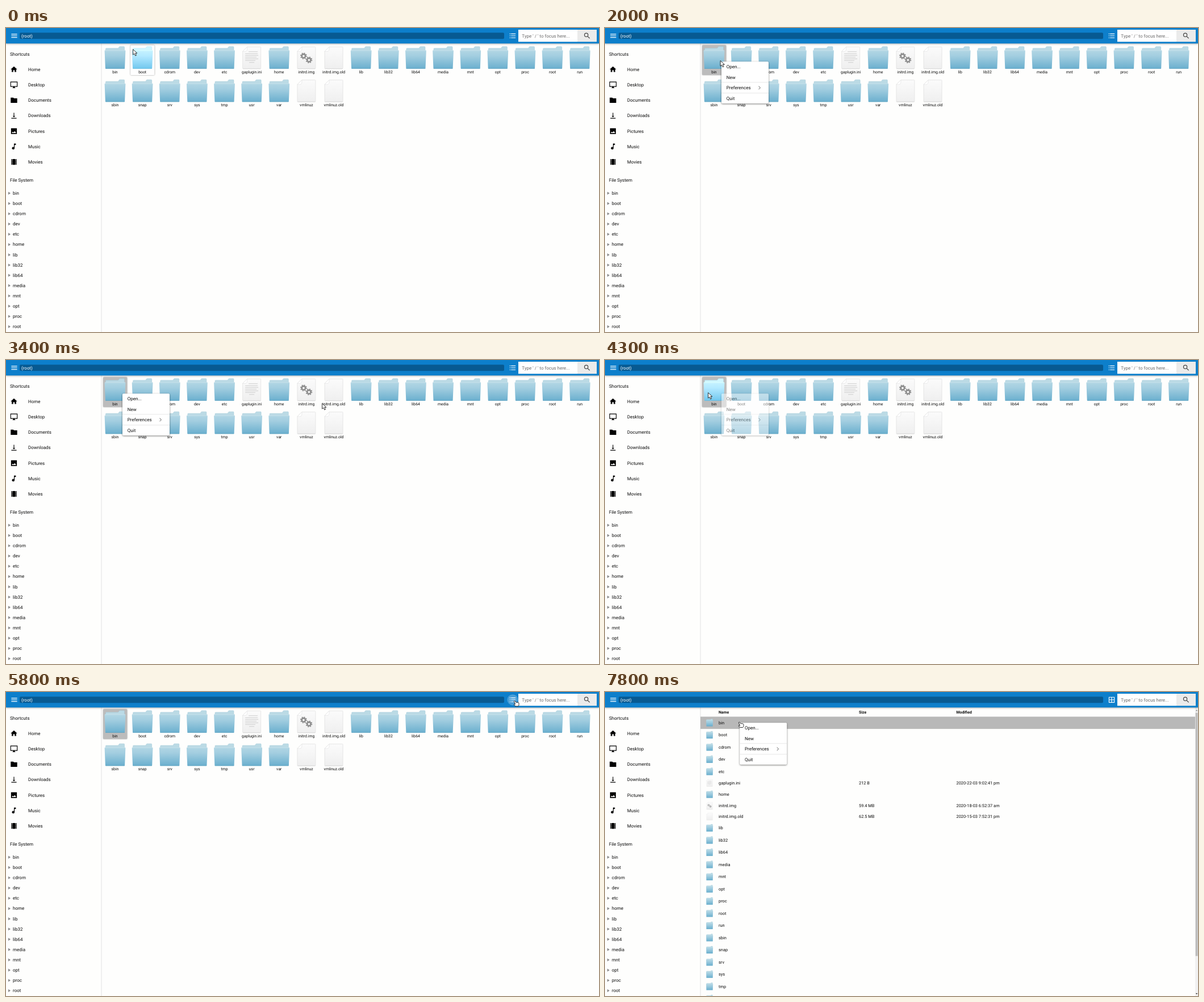
An HTML page that plays this animation: 1044x536 px, repeating every 8 s.

```html
<!DOCTYPE html>
<html lang="en">
<head>
<meta charset="utf-8">
<title>File manager</title>
<style>
html, body { margin: 0; width: 100%; height: 100%; overflow: hidden; background: #fefefd; }
svg { display: block; }
text { font: 8px Roboto, Arial, sans-serif; text-rendering: geometricPrecision; fill: #0c0c0c; white-space: pre; }
.label { font-size: 6.86px; text-anchor: middle; }
.head { font-size: 6.86px; font-weight: 700; }
.cell { font-size: 7.43px; }
.light { fill: #fff; }
.hint { fill: #6b6b6b; }
.card { fill: none; }
.sel .card { fill: #bcbcbc; filter: drop-shadow(0 .6px .8px rgba(0,0,0,.3)); }
.hover .card { fill: #fefefe; filter: drop-shadow(0 .8px 1px rgba(0,0,0,.42)); }
.sel.hover .card { fill: #bcbcbc; }
.hover use { filter: brightness(1.13) saturate(1.1); }
#menu .box { fill: #fff; filter: drop-shadow(0 1px 1.6px rgba(0,0,0,.5)); }
#bar { filter: drop-shadow(0 1px 1.5px rgba(0,0,0,.3)); }
</style>
</head>
<body>
<svg width="1044" height="536" viewBox="0 0 1044 536">
  <defs>
    <linearGradient id="front" x2="0" y2="1">
      <stop stop-color="#b2d6e4"/><stop offset=".3" stop-color="#a3cee0"/><stop offset="1" stop-color="#6aafce"/>
    </linearGradient>
    <linearGradient id="paper" x2="0" y2="1">
      <stop stop-color="#fbfbfb"/><stop offset="1" stop-color="#efefef"/>
    </linearGradient>
    <g id="folder">
      <path d="M2 8V4q0-1 1-1H24l1.5-2Q26-.2 27 0H34q1 0 1 1V8z" fill="#bbdae5" stroke="#9fc7d7" stroke-width=".5"/>
      <path d="M1 6.5H36q1 0 .9 1L35.6 38q-.1 1-1 1H2.4q-.9 0-1-1L.1 7.5q-.1-1 .9-1z" fill="url(#front)"/>
      <path d="M.8 7H36.2" stroke="#cfe6ee" stroke-width=".7"/>
      <path d="M1.6 38.6H35.4" stroke="#5b9fbe" stroke-width=".7"/>
    </g>
    <g id="file">
      <path d="M10.5.5H33.5q1 0 1 1V38q0 1-1 1H3.5q-1 0-1-1V8.5z" fill="url(#paper)" stroke="#dedede" stroke-width=".7"/>
      <path d="M10.5.5Q11 7 8.5 8.3 6 9 2.5 8.5z" fill="#fff" stroke="#d8d8d8" stroke-width=".5"/>
      <path d="M3 38.9H34" stroke="#cfcfcf" stroke-width=".6"/>
    </g>
    <g id="ini">
      <use href="#file"/>
      <path d="M13 9H29M7 12.5H29M7 15.5H30M7 18.5H27M7 21.5H30M7 24.5H25M14 28H23" stroke="#c9c9c9" stroke-width=".9"/>
    </g>
    <g id="gear" fill="none" stroke="#8d8d8d">
      <circle r="3.2" stroke-width="2.6"/>
      <circle r="5" stroke-width="1.8" stroke-dasharray="1.96"/>
    </g>
    <g id="img">
      <use href="#file"/>
      <use href="#gear" x="13.5" y="16.5"/><use href="#gear" x="23" y="23.5"/>
    </g>
  </defs>
  <rect width="1044" height="536" fill="#fefefd"/>
  <g id="side"></g>
  <g id="grid"></g>
  <g id="list"></g>
  <g id="bar"><rect width="1044" height="27.3" fill="#0d7fcb"/></g>
  <g id="tools"></g>
  <g id="menu"></g>
  <path id="arrow" d="M.6.6V10.2L2.9 8.1 4.7 11.9 6.5 11.1 4.8 7.4H7.9z" fill="#fff" stroke="#1c1c1c" stroke-width=".9" stroke-linejoin="round"/>
  <path id="hand" d="M.7 1.4Q1.5-.1 2.8 1L4.2 3.2H7.6Q9.4 3.5 9.5 5.3V7.2Q9.4 9.2 8.2 10H3.6L1 7.9Q.2 6.6 1.6 6.5L3 6.8 2.5 5z" fill="#fff" stroke="#1c1c1c" stroke-width=".9" stroke-linejoin="round"/>
</svg>
<script>
const LOOP = 8000, FRAME = 100;
const el = id => document.getElementById(id);
const text = (x, y, s, cls = '') => `<text x="${x}" y="${y}" class="${cls}">${s}</text>`;

// icons are drawn on a 24 unit square
const icon = (cx, cy, d, fill = '#000', stroke = 'none') =>
  `<path transform="translate(${cx - 6.86} ${cy - 6.86}) scale(.5714)" fill="${fill}" stroke="${stroke}" stroke-width="2" fill-rule="evenodd" d="${d}"/>`;

const names = ('bin boot cdrom dev etc gaplugin.ini home initrd.img initrd.img.old lib lib32 lib64 media mnt ' +
  'opt proc root run sbin snap srv sys tmp usr var vmlinuz vmlinuz.old').split(' ');
const details = {
  'gaplugin.ini': ['212 B', '2020-22-03 9:02:41 pm'],
  'initrd.img': ['59.4 MB', '2020-18-03 6:52:37 am'],
  'initrd.img.old': ['62.5 MB', '2020-15-03 7:52:31 pm']
};
const isFile = n => /\.|vmlinuz/.test(n);
const kind = n => n.endsWith('.ini') ? 'ini' : n.endsWith('.img') ? 'img' : isFile(n) ? 'file' : 'folder';

function sidebar() {
  const shortcuts = {
    Home: 'M10 20v-6h4v6h5v-8h3L12 3 2 12h3v8z',
    Desktop: 'M1 2H23V18H14V20H16V22H8V20H10V18H1zM3 4V16H21V4z',
    Documents: 'M2 4H10L12 6H22V20H2z',
    Downloads: 'M16 13h-3V3h-2v10H8l4 4 4-4zM4 19v2h16v-2H4z',
    Pictures: 'M3 3H21V21H3zM8.5 13.5l2.5 3 3.5-4.5 4.5 6H5z',
    Music: 'M12 3H18V7H14V17A4 4 0 1 1 12 13.55z',
    Movies: 'M4 3H6V5H8V3H16V5H18V3H20V21H18V19H16V21H8V19H6V21H4z' +
      [7, 11, 15].map(y => `M6 ${y}h2v2H6zM16 ${y}h2v2h-2z`).join('')
  };
  let out = '<path d="M168 27V536" stroke="#dcdcdc" stroke-width=".8"/>' +
    text(7, 48.6, 'Shortcuts') + text(7, 270.6, 'File System');
  Object.entries(shortcuts).forEach(([label, d], i) => {
    const y = 73 + 27.2 * i;
    out += icon(14, y, d) + text(39, y + 2.8, label);
  });
  names.filter(n => !isFile(n)).slice(0, 14).forEach((n, i) => {
    const y = 291.1 + 18.1 * i;
    out += `<path d="M4 ${y - 2.4}l4 2.6-4 2.6z" fill="#8c8c8c"/>` + text(12, y + 2.8, n);
  });
  return out;
}

const cells = names.map((n, i) => ({ n, x: 192 + 48.13 * (i % 18), y: 30.3 + 58.4 * Math.floor(i / 18) }));
const gridCell = ({ n, x, y }) => `<g>
  <rect class="card" x="${x - 21}" y="${y}" width="42.3" height="52.6" rx="1.5"/>
  <use href="#${kind(n)}" x="${x - 18.5}" y="${y + 2.5}"/>${text(x, y + 49.7, n, 'label')}</g>`;

function detailList() {
  const row = (y, cols, cls) => [200, 447, 618.5].map((x, i) => text(x, y, cols[i] || '', cls)).join('');
  let out = '<rect x="168" y="43.5" width="871" height="21.6" fill="#b8b8b8"/>' +
    row(37.9, ['Name', 'Size', 'Modified'], 'head');
  let rowTop = 43.4;
  for (const n of names.slice(0, 24)) {
    const h = isFile(n) ? 18.85 : 21.5, mid = rowTop + h / 2;
    out += `<use href="#${kind(n)}" transform="translate(178 ${mid - 6.6}) scale(.33)"/>` +
      row(mid + 2.7, [n, ...(details[n] || [])], 'cell');
    rowTop += h;
  }
  return out + '<rect x="1039" y="27" width="5" height="509" fill="#f1f1f1"/>' +
    '<rect x="1039.6" y="36.5" width="4" height="429" fill="#bdbdbd"/>' +
    '<path d="M1039.8 33.5h3.6l-1.8-2.2z" fill="#888"/><path d="M1039.8 531h3.6l-1.8 2.2z" fill="#444"/>';
}

function toolbar() {
  const bullets = [6, 12, 18].map(y => `M2.7 ${y}h2.6M7 ${y}h14`).join('');
  return icon(14.5, 13.8, 'M3 7H21M3 12H21M3 17H21', 'none', '#fff') +
    '<rect x="24" y="8.3" width="853" height="10.9" rx="2" fill="#075a92"/>' +
    text(27, 16.5, '(root)', 'light') +
    '<circle id="ripple" cx="892" cy="13.8" r="9.6" fill="#fff"/>' +
    `<g id="toList">${icon(892, 13.8, bullets, 'none', '#fff')}</g>` +
    `<g id="toGrid">${icon(892, 13.8, 'M4 4H20V20H4zM12 4V20M4 12H20', 'none', '#fff')}</g>` +
    '<rect x="902" y="3" width="104" height="21.3" fill="#fff"/>' +
    '<rect x="1006" y="3" width="34" height="21.3" fill="#ebebeb"/>' +
    text(908.3, 16.5, "Type ' / ' to focus here...", 'hint') +
    icon(1023, 13.7, 'M15 9.5A5.5 5.5 0 1 1 4 9.5 5.5 5.5 0 1 1 15 9.5M14 14l6 6', 'none', '#444');
}

const contextMenu = () => '<rect class="box" width="83" height="73.7" rx="1.8"/>' +
  '<path d="M0 36.6H83M0 55.6H83" stroke="#dedede" stroke-width=".7"/>' +
  '<path d="M65.6 43.4l2.8 2.8-2.8 2.8" fill="none" stroke="#444" stroke-width=".9"/>' +
  ['Open...', 'New', 'Preferences', 'Quit'].map((s, i) => text(8.8, 12.2 + 18.5 * i, s)).join('');

el('side').innerHTML = sidebar();
el('grid').innerHTML = cells.map(gridCell).join('');
el('list').innerHTML = detailList();
el('tools').innerHTML = toolbar();
el('menu').innerHTML = contextMenu();
const cards = [...el('grid').children];

const ramp = (t, a, b) => Math.min(1, Math.max(0, (t - a) / (b - a)));
const ease = p => p * p * (3 - 2 * p);

// cursor moves: start, end, then where it goes
const moves = [
  [500, 800, 202.5, 57], [2000, 2500, 450.5, 127], [2500, 2700, 726, 246], [2800, 3000, 203, 110],
  [3000, 3200, 877, 32], [3300, 3400, 556, 76], [3500, 3600, 848, 34], [3600, 4100, 181, 57],
  [4300, 5000, 912, 100], [5200, 5800, 893.5, 15], [6100, 6400, 182, 95], [6400, 6500, 241, 66],
  [6600, 6800, 234.5, 52.5]
];
function cursorAt(t) {
  let x = 223, y = 37;
  for (const [from, to, toX, toY] of moves) {
    const p = ease(ramp(t, from, to));
    x += (toX - x) * p;
    y += (toY - y) * p;
  }
  return [x, y];
}

const show = (id, on) => el(id).style.display = on ? '' : 'none';

function draw(now) {
  const t = Math.floor(now % LOOP / FRAME) * FRAME;
  const [x, y] = cursorAt(t);
  const listView = t >= 6000;
  const hand = listView || (x > 882 && y < 25);
  const blocked = t >= 1900 && t < 4300;

  show('grid', !listView);
  show('toList', !listView);
  show('list', listView);
  show('toGrid', listView);
  show('arrow', !hand);
  show('hand', hand);
  el(hand ? 'hand' : 'arrow').setAttribute('transform', `translate(${x} ${y})`);

  cells.forEach((c, i) => {
    const over = !blocked && Math.abs(x - c.x) < 21.2 && y > c.y && y < c.y + 52.6;
    cards[i].setAttribute('class', (i === 0 && t >= 1500 ? 'sel ' : '') + (over ? 'hover' : ''));
  });

  const open = listView ? ramp(t, 7100, 7400) : ramp(t, 1800, 2000);
  const alpha = listView ? open : open * (1 - ramp(t, 4200, 4400));
  const corner = listView ? '237.2 54.2' : '205 59.2';
  show('menu', alpha > 0);
  el('menu').style.opacity = alpha;
  el('menu').setAttribute('transform', `translate(${corner}) scale(${.8 + .2 * open})`);
  el('ripple').style.opacity = .25 * (ramp(t, 5500, 5700) - ramp(t, 6100, 6300));
  requestAnimationFrame(draw);
}
draw(0);
</script>
</body>
</html>
```
